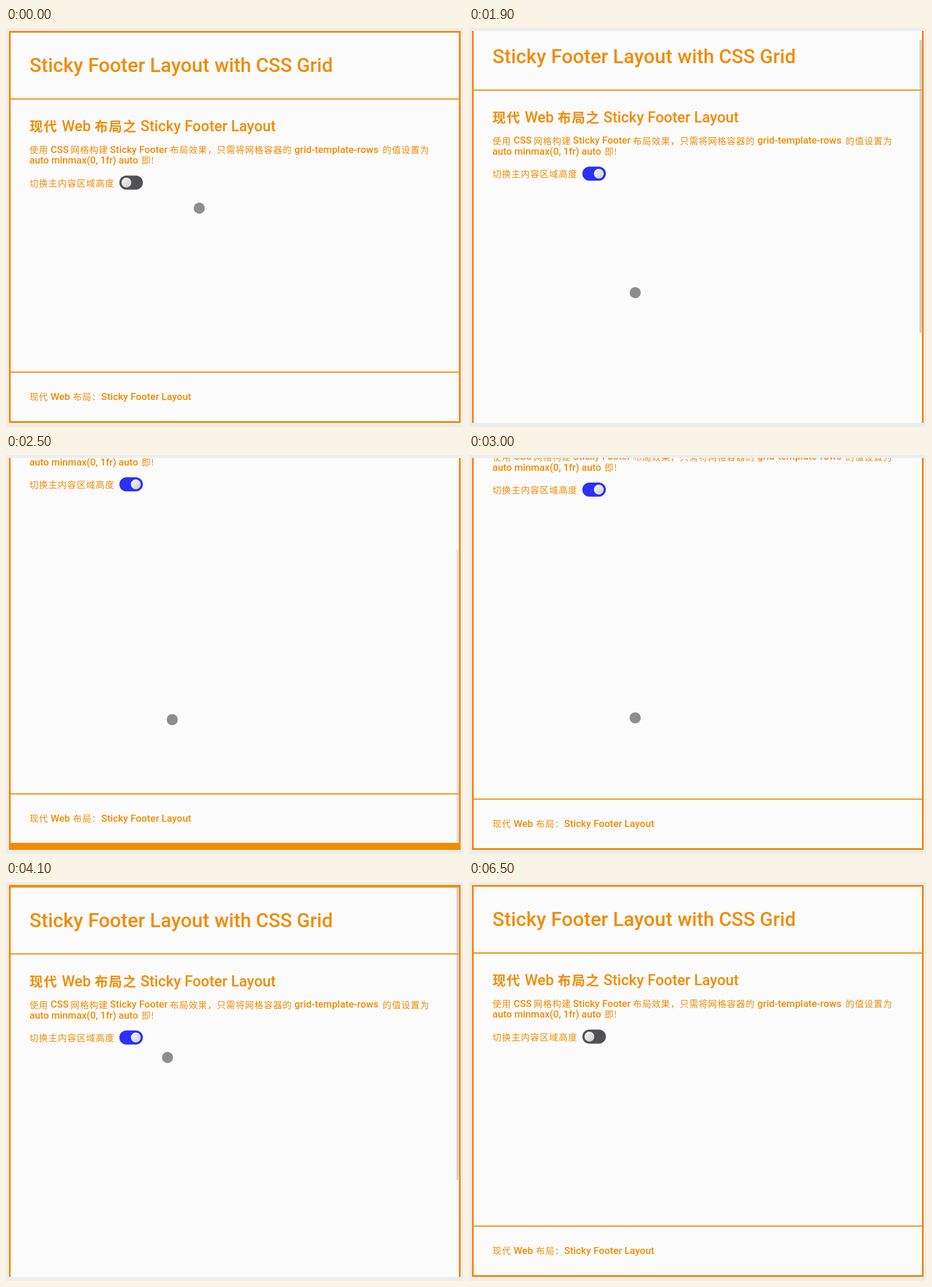
Recreate the animation shown at these times as an HTML page with a canvas. Size 778 by 680 pixels, loop 6600 ms.

```html
<!DOCTYPE html>
<html lang="zh">
<head>
<meta charset="utf-8">
<title>Sticky Footer Layout</title>
<style>
  html, body { margin: 0; width: 100%; height: 100%; overflow: hidden; background: #ededef; }
  canvas { display: block; }
</style>
</head>
<body>
<canvas id="stage" width="778" height="680"></canvas>
<script>
const ctx = document.getElementById('stage').getContext('2d');
const LOOP = 6600, TICK = 100;
const ORANGE = '#f28b00', PAPER = '#fbfbfc', DESK = '#ededef';
const LEFT = 5, TOP = 5, WIDTH = 769, HEIGHT = 668, BORDER = 3, PAD = 40;
const GROWTH = 204.5;           // added page height while the switch is on
const ON = 900, OFF = 4800;     // switch clicks

// Pointer glides: from, to, x, y
const GLIDES = [
  [0, 700, 214, 265],
  [1000, 1600, 283, 451],
  [2900, 4100, 275, 299],
  [4250, 4700, 207, 264],
  [5650, 6200, 420, -14]
];

// Smooth step from 0 to 1 between two times
function ramp(t, from, to) {
  const u = Math.min(1, Math.max(0, (t - from) / (to - from)));
  return u * u * (3 - 2 * u);
}

// Elastic overshoot: half a sine wave
function bump(t, from, length) {
  const u = (t - from) / length;
  return u > 0 && u < 1 ? Math.sin(Math.PI * u) : 0;
}

const scrollAt = t =>
  GROWTH * (ramp(t, 1800, 2400) - ramp(t, 3200, 4000)) +
  9 * bump(t, 2350, 300) - 3 * bump(t, 3850, 300);

const barAt = t =>
  ramp(t, 1750, 1850) - ramp(t, 2300, 2800) +
  ramp(t, 3150, 3250) - ramp(t, 4200, 4600);

function pointerAt(t) {
  let x = 329, y = 307;
  for (const [from, to, tx, ty] of GLIDES) {
    const k = ramp(t, from, to);
    x += (tx - x) * k;
    y += (ty - y) * k;
  }
  return [x, y];
}

function rect(x, y, w, h, color) {
  ctx.fillStyle = color;
  ctx.fillRect(x, y, w, h);
}

function pill(x, y, w, h, color) {
  ctx.fillStyle = color;
  ctx.beginPath();
  ctx.roundRect(x, y, w, h, Math.min(w, h) / 2);
  ctx.fill();
}

function latin(text, x, y, size) {
  ctx.font = `500 ${size}px Roboto, sans-serif`;
  ctx.letterSpacing = '0px';
  ctx.fillText(text, x, y);
}

// Glyphs slightly smaller than their advance, like brush lettering
function han(text, x, y, advance, weight = 400) {
  const size = advance * .94;
  ctx.font = `${weight} ${size}px "Noto Sans CJK SC", "Noto Sans CJK", sans-serif`;
  ctx.letterSpacing = `${advance - size}px`;
  ctx.fillText(text, x, y);
}

function drawSwitch(k) {
  const y = 263.5, x = 205 + 16 * k;
  const mix = (a, b) => a + (b - a) * k;
  pill(193, y - 12, 40, 24, `rgb(${mix(80, 44)},${mix(80, 48)},${mix(85, 248)})`);
  const shade = ctx.createLinearGradient(x - 7, y - 7, x + 7, y + 7);
  shade.addColorStop(0, '#f1f1f1');
  shade.addColorStop(1, '#d2d2d4');
  pill(x - 8.4, y - 8.4, 16.8, 16.8, shade);
}

function drawText(footY) {
  ctx.fillStyle = ORANGE;
  latin('Sticky Footer Layout', PAD, 75, 33.5);
  latin('with CSS Grid', 355, 75, 33);

  han('现代', PAD, 176, 24, 700);
  latin('Web', 95, 176, 25.2);
  han('布局之', 151, 176, 24, 700);
  latin('Sticky Footer Layout', 229, 176, 25.2);

  han('使用', PAD, 213, 16);
  latin('CSS', 76, 212.5, 16.5);
  han('网格构建', 110, 213, 16);
  latin('Sticky Footer', 177, 212.5, 16.7);
  han('布局效果，只需将网格容器的', 279, 213, 16);
  latin('grid-template-rows', 491, 212.5, 16.8);
  han('的值设置为', 641, 213, 16);
  latin('auto minmax(0, 1fr) auto', PAD, 231, 16.7);
  han('即!', 231, 231, 16);
  han('切换主内容区域高度', PAD, 269.5, 16.1);

  han('现代', PAD, footY, 16);
  latin('Web', 76, footY, 16.8);
  han('布局：', 114, footY, 16);
  latin('Sticky Footer Layout', 162, footY, 16.8);
}

function drawPage(extra, knob) {
  rect(LEFT, TOP + BORDER, WIDTH, HEIGHT - 2 * BORDER + extra, PAPER);
  rect(LEFT, 120, WIDTH, 2, ORANGE);
  rect(LEFT, 585.5 + extra, WIDTH, 2, ORANGE);
  drawText(634 + extra);
  drawSwitch(knob);
}

function draw(t) {
  const scroll = scrollAt(t);
  const extra = t >= ON && t < OFF ? GROWTH : 0;
  const knob = ramp(t, ON, ON + 180) - ramp(t, OFF, OFF + 180);

  rect(0, 0, 778, 680, DESK);
  ctx.save();
  ctx.beginPath();
  ctx.rect(LEFT, TOP, WIDTH, HEIGHT);
  ctx.clip();
  rect(LEFT, TOP, WIDTH, HEIGHT, ORANGE);

  ctx.save();
  ctx.translate(0, -scroll);
  drawPage(extra, knob);
  ctx.restore();

  rect(LEFT, TOP, BORDER, HEIGHT, ORANGE);
  rect(LEFT + WIDTH - BORDER, TOP, BORDER, HEIGHT, ORANGE);
  const y = 8.5 + .742 * Math.max(0, Math.min(GROWTH, scroll));
  pill(767, y, 3.5, 500, `rgba(190,189,193,${.7 * barAt(t)})`);
  ctx.restore();

  const [px, py] = pointerAt(t);
  pill(px - 9.5, py - 9.5, 19, 19, 'rgba(90,90,94,.68)');
}

// The picture advances in ticks; the small lead absorbs start-up delay
const start = performance.now();
function frame(now) {
  const tick = Math.floor(Math.max(0, now - start) / TICK + .2);
  draw(tick * TICK % LOOP);
  requestAnimationFrame(frame);
}
draw(0);
requestAnimationFrame(frame);
</script>
</body>
</html>
```
